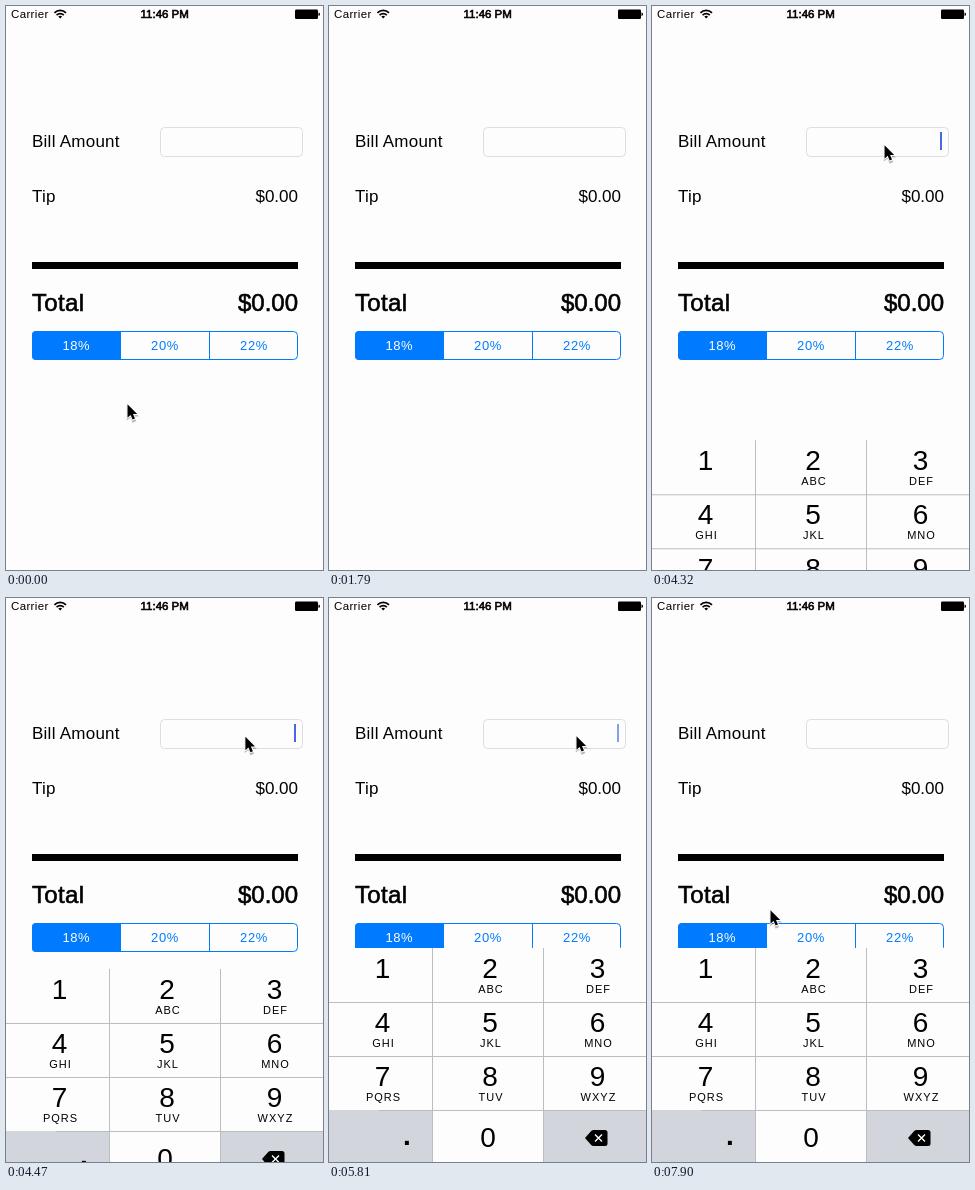
Animation of 317 by 564 pixels, one loop 8000 ms. Source, as an HTML page:

```html
<!DOCTYPE html>
<html lang="en">
<head>
<meta charset="utf-8">
<title>Tip calculator</title>
<style>
  html, body { margin: 0; width: 100%; height: 100%; overflow: hidden; background: #fdfdfd; }
  svg { display: block; width: 317px; height: 564px; }
  text { font-family: "Liberation Sans", Arial, sans-serif; fill: #000; }
  .label { font-size: 17px; letter-spacing: .25px; }
  .amount { font-size: 17px; }
  .medium { stroke: #000; stroke-width: .6px; }
  .total { font-size: 24px; }
  .status { font-size: 11.5px; }
  .segment { font-size: 13px; letter-spacing: .6px; text-anchor: middle; fill: #007aff; }
  .digit { font-size: 28px; text-anchor: middle; }
  .letters { font-size: 11px; letter-spacing: 1px; text-anchor: middle; }
  .end { text-anchor: end; }
</style>
</head>
<body>
<svg viewBox="0 0 317 564">
  <rect width="317" height="564" fill="#fdfdfd"/>

  <g id="status-bar">
    <text class="status" x="5" y="12.3" letter-spacing=".35">Carrier</text>
    <path d="M48.4 6.8a8.2 8.2 0 0 1 11.6 0M50.6 9.1a5 5 0 0 1 7.2 0" fill="none" stroke="#000" stroke-width="1.7"/>
    <path d="M54.2 12.6l-1.9-2a2.7 2.7 0 0 1 3.8 0z"/>
    <text class="status medium" x="158.7" y="12.3" text-anchor="middle">11:46 PM</text>
    <rect x="289" y="3.5" width="23" height="9.5" rx="1.2"/>
    <path d="M312.5 6.4q1.5.3 1.5 1.8t-1.5 1.8z"/>
  </g>

  <text class="label" x="26" y="141">Bill Amount</text>
  <rect x="154.5" y="121.5" width="142" height="29" rx="4" fill="#fdfdfd" stroke="#dedede"/>
  <rect id="caret" x="288" y="126" width="2" height="18" fill="#4569e2"/>
  <text class="label" x="26" y="196">Tip</text>
  <text class="amount end" x="292" y="196">$0.00</text>
  <rect x="26" y="256" width="266" height="7"/>
  <text class="total medium" x="26" y="305" letter-spacing=".35">Total</text>
  <text class="total medium end" x="292" y="305">$0.00</text>

  <rect x="26.5" y="325.5" width="265" height="28" rx="4" fill="#fdfdfd" stroke="#007aff"/>
  <path d="M115 325H30a4 4 0 0 0-4 4v21a4 4 0 0 0 4 4h85z" fill="#007aff"/>
  <path d="M203.5 326v27" stroke="#007aff"/>
  <text class="segment" x="70.3" y="344" style="fill:#fff">18%</text>
  <text class="segment" x="159" y="344">20%</text>
  <text class="segment" x="248" y="344">22%</text>

  <g id="keyboard">
    <rect y="350" width="317" height="214" fill="#fdfdfd"/>
    <path d="M0 512h103v52H0zM215 512h102v52H215z" fill="#d2d5db"/>
    <path d="M103.5 350v214M214.5 350v214M0 404.5h317M0 458.5h317M50 512.5h267" stroke="#bcbdbf"/>
    <g id="keys"></g>
    <text class="digit" x="78" y="546.5" font-weight="bold">.</text>
    <path d="M256 540l6.2-7q1-1 2.4-1H276q2.5 0 2.5 2.5v11q0 2.5-2.5 2.5h-11.4q-1.4 0-2.4-1z"/>
    <path d="M266 536.5l7 7m0-7l-7 7" stroke="#fff" stroke-width="1.4"/>
  </g>

  <g id="cursor">
    <path d="M.8 2v15l3.6-2.8 2.2 5 3.6-1.6-2-4.6h4.8z" opacity=".28"/>
    <path d="M1.5 .8v13.4l3.1-2.8 2 4.7 2.4-1-2-4.6h4.2z" stroke="#fff" stroke-width="1.8"
          stroke-linejoin="round" paint-order="stroke"/>
  </g>
</svg>
<script>
const LOOP = 8000;
const FRAME = 149.1;
const TYPING_STARTS = 29;
const byId = id => document.getElementById(id);
const [caret, keyboard, cursor] = ["caret", "keyboard", "cursor"].map(byId);
const clamp = v => Math.min(1, Math.max(0, v));
const easeOut = (u, power) => 1 - (1 - clamp(u)) ** power;

const moves = [
  { start: 5, end: 7, x: 143, y: 515 },
  { start: 8, end: 12, x: 216, y: 570 },
  { start: 13, end: 14, x: 190, y: 516 },
  { start: 15, end: 17, x: 156, y: 397 },
  { start: 18, end: 21, x: 217, y: 187 },
  { start: 22, end: 26, x: 223, y: 139 },
  { start: 28, end: 32, x: 246, y: 137.5 },
  { start: 51, end: 53, x: 117, y: 311.5 }
];

function pointerAt(frame) {
  return moves.reduce((from, to) => {
    const u = easeOut((frame - to.start) / (to.end - to.start), 1.5);
    return { x: from.x + (to.x - from.x) * u, y: from.y + (to.y - from.y) * u };
  }, { x: 120, y: 397.5 });
}

// Blinks once a second with a short fade at both ends
function caretOpacity(time) {
  const phase = time % 1000;
  return clamp(Math.min((phase - 200) / 100, (890 - phase) / 130));
}

const keyboardOffset = time => 214 * (1 - easeOut((time - 4155) / 500, 2.4));

function buildKeys() {
  const letters = ["", "ABC", "DEF", "GHI", "JKL", "MNO", "PQRS", "TUV", "WXYZ"];
  const label = (kind, x, y, value) => `<text class="${kind}" x="${x}" y="${y}">${value}</text>`;
  byId("keys").innerHTML = letters.map((group, i) => {
    const x = 53.5 + 107.5 * (i % 3);
    const y = 379.6 + 54 * Math.floor(i / 3);
    return label("digit", x, y, i + 1) + label("letters", x + 1, y + 15.4, group);
  }).join("") + label("digit", 159, 549, 0);
}

function render(t) {
  const frame = Math.floor((t + 8) / FRAME);
  const time = frame * FRAME - 8;
  const typing = frame >= TYPING_STARTS;
  const { x, y } = pointerAt(frame);
  cursor.setAttribute("transform", `translate(${x} ${y})`);
  caret.setAttribute("opacity", typing ? caretOpacity(time) : 0);
  keyboard.setAttribute("transform", `translate(0 ${typing ? keyboardOffset(time) : 214})`);
}

function tick() {
  render(performance.now() % LOOP);
  requestAnimationFrame(tick);
}

buildKeys();
tick();
</script>
</body>
</html>
```
